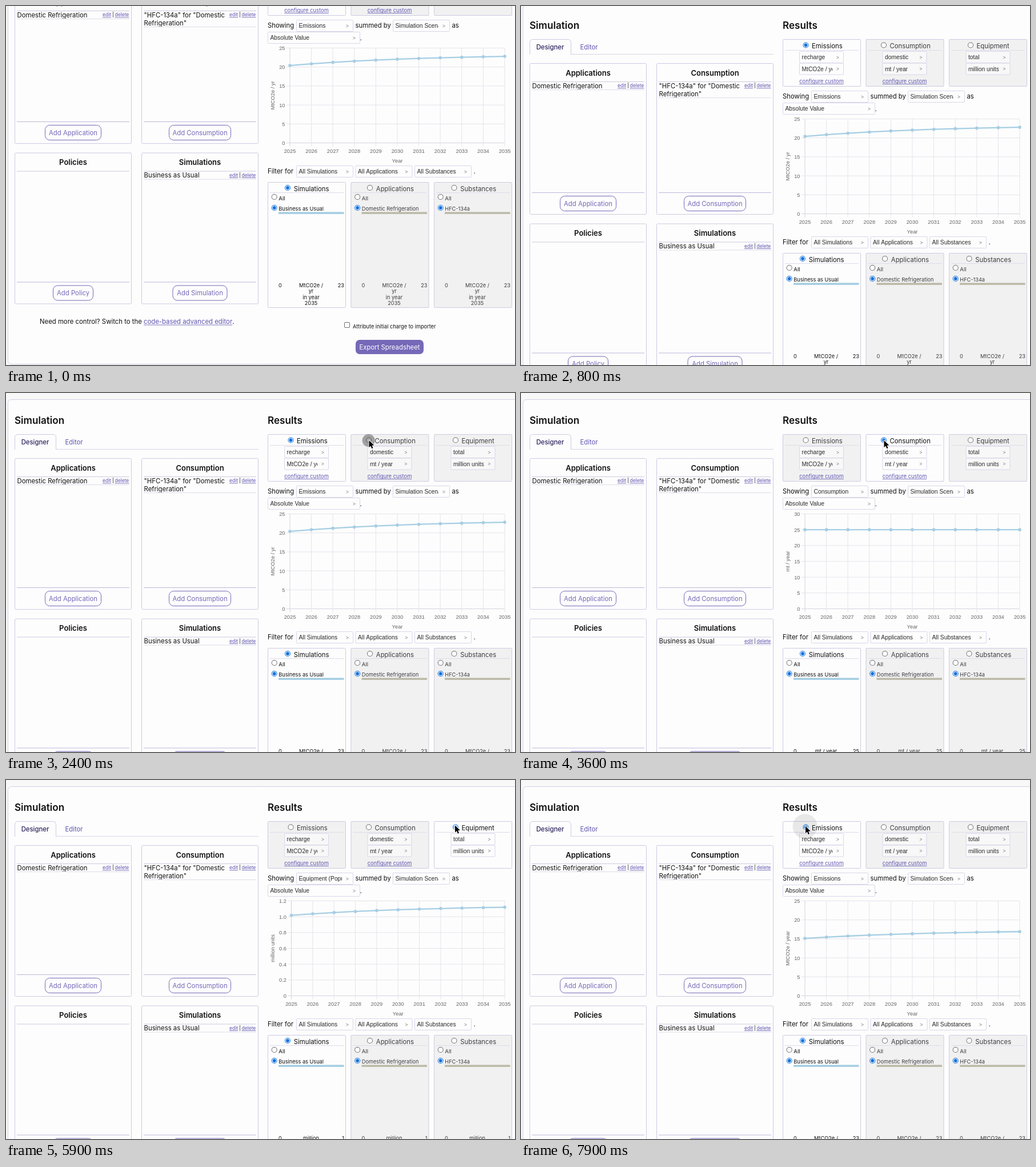
An HTML page with a canvas that plays this animation: 891x628 px, repeating every 8000 ms.

```html
<!DOCTYPE html>
<html lang="en">
<head>
<meta charset="utf-8">
<title>Simulation designer</title>
<style>
  html, body { margin: 0; width: 100%; height: 100%; overflow: hidden; background: #f8f8f8; }
  canvas { display: block; }
</style>
</head>
<body>
<canvas id="stage" width="891" height="628"></canvas>
<script>
const ctx = document.getElementById('stage').getContext('2d');
const W = 891, H = 628, LOOP = 8000;
const UI = 'Inter, sans-serif';
const FORM = '"Liberation Sans", Arial, sans-serif';
const PAPER = '#fdfdfd', SHADE = '#f1f1f1', INK = '#111', DIM = '#3c3c40';
const EDGE = '#cdcae2', RULE = '#cdcae0', PURPLE = '#7569b8', LINK = '#5f54b0';
const BLUE = '#1070dc', SERIES = '#a6cee3';

const COLUMN = 145.5;      // distance between the result panels
const SCROLL = { from: 138, end: 1100 };

const emissions = {
  panel: 0, metric: 'Emissions', max: 25, step: 5, left: 497, digits: 0,
  first: 20.4, last: 22.8, total: '23', bar: ['MtCO2e /', 'yr', 'in year', '2035']
};
const consumption = {
  panel: 1, metric: 'Consumption', axis: 'mt / year', max: 30, step: 5, left: 497, digits: 0,
  first: 25, last: 25, total: '25', bar: ['mt / year', 'in year', '2035']
};
const equipment = {
  panel: 2, metric: 'Equipment (Population)', axis: 'million units', max: 1.2, step: 0.2, left: 499.5,
  digits: 1, first: 1.02, last: 1.122, total: '1', bar: ['million', 'units', 'in year', '2035']
};
const views = [
  { at: -2000, ...emissions, axis: 'MtCO2e / yr' },
  { at: 2450, ...consumption },
  { at: 5111, ...equipment },
  { at: 7614, ...emissions, axis: 'MtCO2e / year' }
];

const clicks = [2350, 5010, 7510];
const path = [
  [1300, 690, 330], [2200, 635.5, 83], [4000, 635.5, 83], [4850, 786, 79.5],
  [6250, 786, 79.5], [6900, 551.5, 65], [7400, 498, 81]
];

const clamp = v => Math.max(0, Math.min(1, v));
const smooth = p => p * p * (3 - 2 * p);

// y is the middle of the capitals
function text(s, x, y, o = {}) {
  const { size = 11.35, weight = 400, family = UI, color = INK, align = 'left', underline = false } = o;
  ctx.font = `${weight} ${size}px ${family}`;
  ctx.textAlign = align;
  ctx.fillStyle = color;
  const base = y + size * 0.385;
  ctx.fillText(s, x, base);
  if (underline) {
    const w = ctx.measureText(s).width;
    const start = align === 'center' ? x - w / 2 : x;
    ctx.fillRect(start, base + 1.2, w, 0.8);
  }
}

function line(x1, y1, x2, y2, color = RULE, width = 1) {
  ctx.strokeStyle = color;
  ctx.lineWidth = width;
  ctx.beginPath();
  ctx.moveTo(x1, y1);
  ctx.lineTo(x2, y2);
  ctx.stroke();
}

function box(x, y, w, h, r, fill, stroke) {
  ctx.beginPath();
  ctx.roundRect(x, y, w, h, r);
  if (fill) { ctx.fillStyle = fill; ctx.fill(); }
  if (stroke) { ctx.strokeStyle = stroke; ctx.lineWidth = 1; ctx.stroke(); }
}

function disc(x, y, r, fill) {
  ctx.beginPath();
  ctx.arc(x, y, r, 0, Math.PI * 2);
  ctx.fillStyle = fill;
  ctx.fill();
}

function radio(x, y, on) {
  disc(x, y, 5, on ? BLUE : '#707074');
  disc(x, y, 4, '#fff');
  if (on) disc(x, y, 2.9, BLUE);
}

function select(s, x, y, w, dim) {
  box(x, y, w, 20, 1, dim ? '#f8f8f8' : PAPER, '#d9d6ea');
  ctx.save();
  ctx.beginPath();
  ctx.rect(x, y, w - 19.5, 20);
  ctx.clip();
  text(s, x + 4, y + 10, { size: 10.3, family: FORM, color: '#2a2a2a' });
  ctx.restore();
  text('>', x + w - 10, y + 10, { size: 8.3, family: FORM, color: '#777', align: 'center' });
}

function button(s, x, y, w) {
  box(x, y, w, 26, 8, PAPER, PURPLE);
  text(s, x + w / 2, y + 12.7, { color: PURPLE, align: 'center' });
}

function listBox(x, y, title, lines, action, bw) {
  box(x + 0.5, y + 0.5, 204, 264, 2, null, EDGE);
  text(title, x + 102.5, y + 16.7, { size: 13, weight: 600, align: 'center' });
  line(x + 4, y + 32.5, x + 201, y + 32.5);
  lines.forEach((s, i) => text(s, x + 4.5, y + 39.5 + 14 * i));
  if (lines.length) {
    const small = { size: 8.5, color: LINK, underline: true };
    text('edit', x + 154, y + 39, small);
    text('|', x + 171.3, y + 39, { size: 8.5 });
    text('delete', x + 175.5, y + 39, small);
    const bottom = y + 32.5 + 14 * lines.length;
    line(x + 4, bottom, x + 201, bottom, '#dddbea');
  }
  line(x + 4, y + 226.5, x + 201, y + 226.5, '#bcb8da');
  button(action, x + 102.5 - bw / 2, y + 232.5, bw);
}

function designer() {
  text('Simulation', 15, 47.5, { size: 17.1, weight: 600 });
  line(88, 98.5, 442, 98.5, '#d6d3e8');
  ctx.strokeStyle = EDGE;
  ctx.beginPath();
  ctx.moveTo(15.5, 99);
  ctx.lineTo(15.5, 78);
  ctx.arcTo(15.5, 72.5, 21, 72.5, 5);
  ctx.lineTo(82, 72.5);
  ctx.arcTo(87.5, 72.5, 87.5, 78, 5);
  ctx.lineTo(87.5, 99);
  ctx.stroke();
  text('Designer', 51, 85.5, { weight: 500, color: '#2e2560', align: 'center' });
  text('Editor', 119, 85.5, { color: LINK, align: 'center' });

  listBox(15, 114, 'Applications', ['Domestic Refrigeration'], 'Add Application', 98);
  listBox(237, 114, 'Consumption', ['"HFC-134a" for "Domestic', 'Refrigeration"'], 'Add Consumption', 108);
  listBox(15, 394.5, 'Policies', [], 'Add Policy', 70);
  listBox(237, 394.5, 'Simulations', ['Business as Usual'], 'Add Simulation', 95);

  const lead = 'Need more control? Switch to the ';
  text(lead, 59, 690);
  const x = 59 + ctx.measureText(lead).width;
  text('code-based advanced editor', x, 690, { color: LINK, underline: true });
  text('.', x + ctx.measureText('code-based advanced editor').width, 690);
}

function metricPanel(i, active, title, radioX, options, custom) {
  const x = 458 + COLUMN * i;
  box(x + 0.5, 72.5, 136, 82, 1, active ? PAPER : SHADE, EDGE);
  radio(radioX, 82.5, active);
  text(title, radioX + 10.5, 83.5, { color: active ? INK : DIM });
  line(x + 4, 91.5, x + 133, 91.5, '#dedcec');
  options.forEach((s, k) => select(s, x + 29.5 + (i === 2 ? 0.5 : 0), 93.5 + 20.5 * k, 77, !active));
  if (custom) text('configure custom', x + 68, 145.3, { size: 9.4, color: LINK, align: 'center', underline: true });
}

function chart(view, t) {
  const { left, max, step, digits, first, last } = view;
  const right = 873, top = 211.5, bottom = 377.5;
  const label = { size: 9.3, family: FORM, color: '#666' };
  const yOf = v => bottom - (bottom - top) * v / max;
  const xOf = i => left + (right - left) * i / 10;
  const grid = '#e5e4ec';

  for (let i = 0; i <= Math.round(max / step); i++) {
    const v = i * step, y = yOf(v);
    line(left - 6, y, right, y, i ? grid : '#d5d4de');
    text(v ? v.toFixed(digits) : '0', left - 8.5, y, { ...label, align: 'right' });
  }
  for (let i = 0; i <= 10; i++) {
    line(xOf(i), top, xOf(i), bottom + 6, i ? grid : '#d5d4de');
    text(String(2025 + i), xOf(i), 391.5, { ...label, align: 'center' });
  }
  text('Year', (left + right) / 2, 408.3, { ...label, align: 'center' });
  ctx.save();
  ctx.translate(466, (top + bottom) / 2);
  ctx.rotate(-Math.PI / 2);
  text(view.axis, 0, 0, { ...label, align: 'center' });
  ctx.restore();

  const grow = 1 - Math.pow(1 - clamp((t - view.at) / 1000), 4);
  const decay = i => 1 - Math.exp(-0.16 * i);
  const points = Array.from({ length: 11 }, (_, i) =>
    [xOf(i), yOf(grow * (first + (last - first) * decay(i) / decay(10)))]);
  ctx.strokeStyle = SERIES;
  ctx.lineWidth = 2.3;
  ctx.beginPath();
  points.forEach(p => ctx.lineTo(...p));
  ctx.stroke();
  points.forEach(([x, y]) => disc(x, y, 2.8, SERIES));
}

function filterPanel(i, title, radioX, item, view) {
  const x = 458 + COLUMN * i, active = i === 0, color = active ? INK : DIM;
  const small = { size: 9.2, color };
  box(x + 0.5, 446.5, 136, 219, 1, active ? PAPER : SHADE, EDGE);
  radio(radioX, 456, active);
  text(title, radioX + 10.8, 457.3, { color });
  line(x + 4, 464.5, x + 133, 464.5, '#dedcec');
  radio(x + 11.7, 472, false);
  text('All', x + 19.3, 474.3, { ...small, size: 9.6 });
  radio(x + 11.7, 491, true);
  text(item, x + 19.3, 492.5, small);
  ctx.fillStyle = active ? SERIES : '#bcbba9';
  ctx.fillRect(x + 19, 498.3, 114.5, 3.6);
  text('0', x + 19, 626, small);
  view.bar.forEach((s, k) => text(s, x + 76, 626 + 10.5 * k, { ...small, align: 'center' }));
  text(view.total, x + 134, 626, { ...small, align: 'right' });
}

function results(view, t) {
  text('Results', 458, 47.5, { size: 17.1, weight: 600 });
  metricPanel(0, view.panel === 0, 'Emissions', 498.5, ['recharge', 'MtCO2e / year'], true);
  metricPanel(1, view.panel === 1, 'Consumption', 635, ['domestic', 'mt / year'], true);
  metricPanel(2, view.panel === 2, 'Equipment', 787, ['total', 'million units'], false);

  text('Showing', 458, 172);
  select(view.metric, 508.5, 162.5, 99);
  text('summed by', 611.5, 172);
  select('Simulation Scenario', 677.5, 162.5, 99);
  text('as', 780.5, 172);
  select('Absolute Value', 458.5, 183.5, 161);
  text('.', 619.5, 193.5);

  chart(view, t);

  text('Filter for', 458, 427);
  ['All Simulations', 'All Applications', 'All Substances']
    .forEach((s, i) => select(s, 508.5 + 103.5 * i, 417.5, 99));
  text('.', 818.5, 427);
  filterPanel(0, 'Simulations', 493, 'Business as Usual', view);
  filterPanel(1, 'Applications', 637, 'Domestic Refrigeration', view);
  filterPanel(2, 'Substances', 784.5, 'HFC-134a', view);

  box(592.5, 691.5, 9, 9, 1.5, '#fff', '#707074');
  text('Attribute initial charge to importer', 607, 698.3, { size: 9.2 });
  box(612, 722, 119, 25, 7, PURPLE);
  text('Export Spreadsheet', 671.5, 734.3, { color: '#fff', align: 'center' });
}

function pointerAt(t) {
  const k = path.findIndex(p => p[0] > t);
  if (k < 0) return path[path.length - 1].slice(1);
  const [t0, x0, y0] = path[k - 1], [t1, x1, y1] = path[k];
  const p = smooth((t - t0) / (t1 - t0));
  return [x0 + (x1 - x0) * p, y0 + (y1 - y0) * p];
}

function ripple(x, y, age) {
  if (age < 0 || age > 550) return;
  const r = 8 + 14 * (1 - (1 - clamp(age / 480)) ** 2.2);
  disc(x, y, r, `rgba(80,80,84,${0.62 * Math.exp(-age / 240)})`);
}

function pointer(t) {
  if (t < path[0][0]) return;
  const [x, y] = pointerAt(t);
  clicks.forEach(start => ripple(x - 0.8, y, t - start));
  ctx.save();
  ctx.translate(x, y);
  ctx.beginPath();
  for (const p of [[0, 0], [0, 12.2], [2.9, 9.6], [4.9, 14.2], [7, 13.3], [5.1, 8.8], [8.9, 8.6]]) ctx.lineTo(...p);
  ctx.closePath();
  ctx.lineJoin = 'round';
  ctx.lineWidth = 1.8;
  ctx.strokeStyle = '#fff';
  ctx.stroke();
  ctx.fillStyle = '#000';
  ctx.fill();
  ctx.restore();
}

function draw(now) {
  const t = now % LOOP;
  const view = views.filter(v => v.at <= t).pop();
  const offset = Math.round(SCROLL.from * Math.pow(1 - clamp(t / SCROLL.end), 1.75));
  ctx.fillStyle = '#f8f8f8';
  ctx.fillRect(0, 0, W, H);
  ctx.save();
  ctx.translate(0, -offset);
  box(3.5, 11.5, 900, 753, 6, PAPER, '#d3d0e6');
  designer();
  results(view, t);
  ctx.restore();
  pointer(t);
  requestAnimationFrame(draw);
}
requestAnimationFrame(draw);
</script>
</body>
</html>
```
